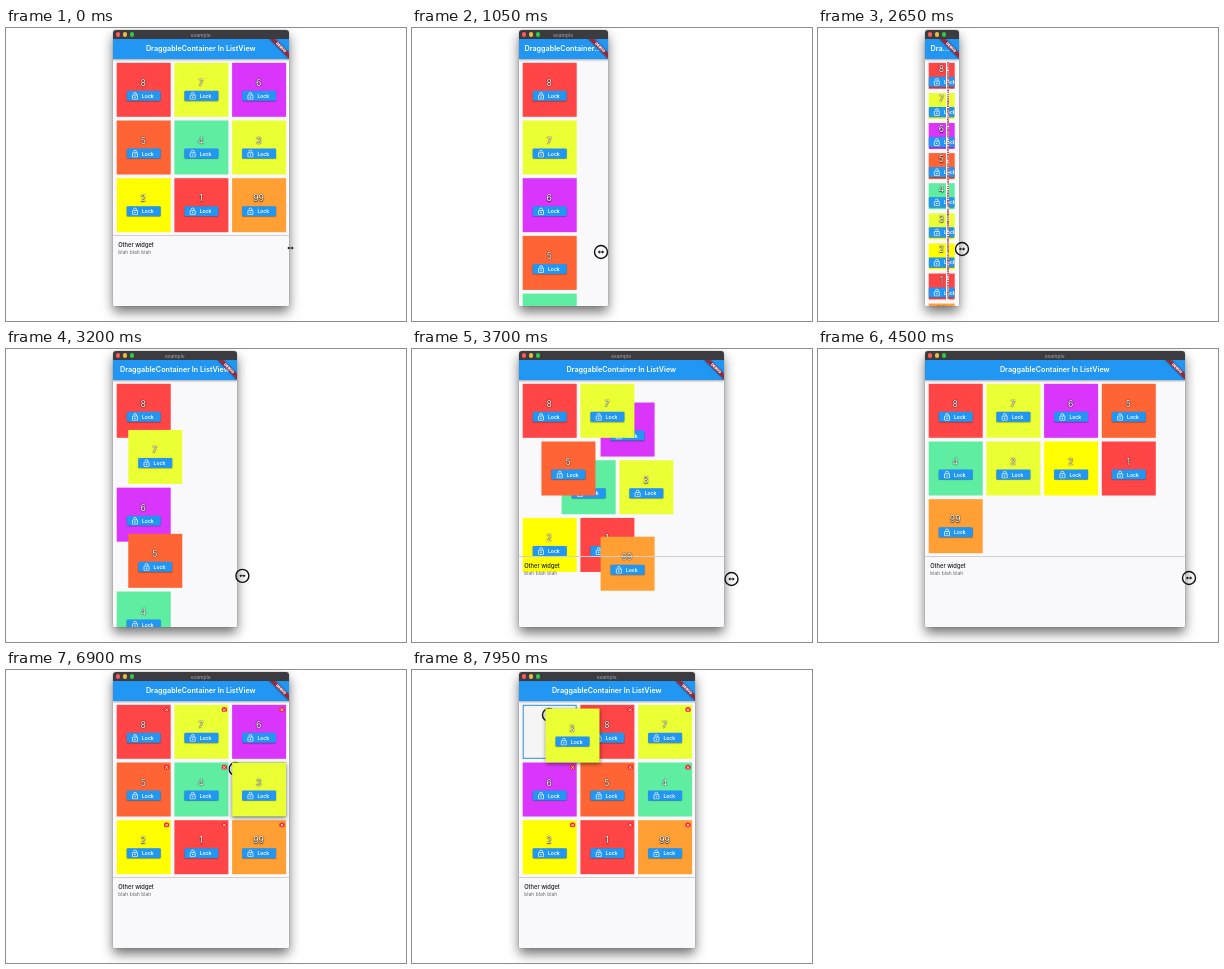
Write an HTML page that moves like this. It is 400 px wide and 293 px high and loops after 8000 ms.

```html
<!DOCTYPE html>
<html lang="en">
<head>
<meta charset="utf-8">
<title>Draggable grid</title>
<style>
html, body { margin: 0; width: 100%; height: 100%; overflow: hidden; background: #fff; }
body { position: relative; font-family: Inter, Roboto, sans-serif; }
div, svg { position: absolute; box-sizing: border-box; white-space: nowrap; }
#shadow { left: 106.5px; top: 1.5px; height: 276px; border-radius: 3px;
  box-shadow: 0 6px 12px rgba(0,0,0,.55), 0 0 1px rgba(0,0,0,.6); }
#window { inset: 0; border-radius: 3px 3px 1.5px 1.5px; overflow: hidden; background: #f9f8fa; }
#titlebar { left: 0; right: 0; top: 0; height: 9px; background: #3b3b40; z-index: 6; }
#caption { left: 0; right: 0; top: 0; font-size: 5px; line-height: 10px; text-align: center; color: #a5a5a8; }
.light { top: 2.7px; width: 4.4px; height: 4.4px; border-radius: 50%; }
#appbar { left: 0; right: 0; top: 9px; height: 20.5px; padding: 0 6px; background: #2196f3; z-index: 5;
  box-shadow: 0 1px 2px rgba(0,0,0,.35); color: #fff; font-size: 7.2px; font-weight: 600;
  line-height: 20.5px; text-align: center; overflow: hidden; text-overflow: ellipsis; }
#appbar.tight { text-align: left; }
#corner { right: 0; top: 9px; width: 30px; height: 30px; overflow: hidden; z-index: 7; }
#debug { left: 15.6px; top: 10px; width: 28.8px; height: 4.4px; transform-origin: 14.4px -10px;
  transform: rotate(45deg); background: rgba(165,24,30,.85); box-shadow: 0 0 2px rgba(0,0,0,.6);
  color: #fff; font-size: 3.7px; font-weight: 900; line-height: 4.4px; text-align: center; }
.tile { left: 0; top: 0; overflow: hidden; }
.label { left: 0; right: 0; top: 50%; margin-top: -11.6px; line-height: 11px; font-size: 8.6px;
  text-align: center; color: #fff; text-shadow: 0 0 1px #000, 0 .5px 1.2px rgba(0,0,0,.8); }
.button { left: 50%; top: 50%; width: 34px; max-width: 100%; height: 10.8px; margin-top: 1px;
  transform: translateX(-50%); border-radius: 1px; background: #2196f3; color: #fff;
  box-shadow: 0 .6px 1px rgba(0,0,0,.4); overflow: hidden; }
.button svg { left: 4.4px; top: 1px; width: 8.6px; height: 8.6px; }
.button div { left: 15.8px; top: 0; font-size: 5.04px; font-weight: 600; line-height: 10.8px; }
.remove { right: .3px; top: 2.2px; width: 5.8px; height: 5.8px; }
#slot { left: 0; top: 0; width: 54px; height: 54px; border: 1.4px solid #2a8fe0; background: #f5f5f6; }
#overflow { top: 32.5px; height: 238px; width: 3.2px; overflow: hidden; z-index: 3; background: #fff;
  color: #a00010; font-size: 2.6px; font-weight: 800; line-height: 3.2px; writing-mode: vertical-rl; }
#other { left: 0; right: 0; height: 30px; border-top: .6px solid #cfcfd2; z-index: 4; }
#other div { left: 5.7px; line-height: 8px; }
#heading { top: 5.4px; font-size: 5.76px; font-weight: 500; color: #1c1c1e; }
#detail { top: 12.4px; font-size: 5.04px; color: #6c6c70; }
#cursor { left: 0; top: 0; width: 20px; height: 20px; margin: -10px 0 0 -10px; }
</style>
</head>
<body>
<div id="shadow"><div id="window">
  <div id="titlebar">
    <div class="light" style="left:3.2px;background:#fc5b57"></div>
    <div class="light" style="left:10.3px;background:#e8bd3f"></div>
    <div class="light" style="left:17.4px;background:#34c648"></div>
    <div id="caption">example</div>
  </div>
  <div id="appbar">DraggableContainer In ListView</div>
  <div id="corner"><div id="debug">DEBUG</div></div>
  <div id="slot"></div>
  <div id="overflow"></div>
  <div id="other"><div id="heading">Other widget</div><div id="detail">blah blah blah</div></div>
</div></div>
<svg id="cursor" viewBox="-10 -10 20 20">
  <circle id="ring" r="6.5" fill="none" stroke="#111" stroke-width="1.4"/>
  <path id="resize" d="M-3.2 0L-1.2 -1.7V-.5H1.2V-1.7L3.2 0L1.2 1.7V.5H-1.2V1.7Z" fill="#111" stroke="#fff" stroke-width=".6" paint-order="stroke"/>
  <path id="pointer" d="M-1 -2V4L.4 2.8L1.4 5L2.4 4.5L1.5 2.4H3.3Z" fill="#111" stroke="#fff" stroke-width=".6" paint-order="stroke"/>
</svg>
<script>
const LOOP = 8000, STEP = 50, SLIDE = 200;
const LEFT = 106.5, TOP = 1.5, TILE = 54, GAP = 3.7;
const ORIGIN = { x: 110.2 - LEFT, y: 34.3 - TOP };
const DRAGGED = 5, LIFT = 6900;

const ITEMS = [
  ['8', '#ff4545'], ['7', '#ebff35'], ['6', '#da36fb'],
  ['5', '#ff6434'], ['4', '#5feda2'], ['3', '#ebff35'],
  ['2', '#ffff00'], ['1', '#ff4545'], ['99', '#ff9f34']
];

// time, right edge of the window
const EDGE = [
  [0, 283], [50, 282.5], [850, 215], [1050, 196], [1700, 155], [2200, 137], [2500, 137],
  [2650, 141], [3400, 264], [3700, 312], [4250, 349], [4500, 367], [4700, 382],
  [5100, 310], [5350, 286], [5500, 285], [5800, 283]
];
// time, cursor x, cursor y
const CURSOR = [
  [0, 284.5, 220], [850, 210, 224], [1050, 189, 224], [1700, 150, 223], [2200, 138, 221],
  [2650, 144, 221], [3400, 270, 229], [3700, 319.5, 230], [4250, 354, 229], [4500, 371, 229],
  [4700, 386, 229], [5100, 308, 229], [5350, 284.5, 229], [6000, 284.5, 229], [6200, 255, 150],
  [6400, 229.6, 99], [6950, 229.6, 99], [7250, 200, 80], [7450, 172, 62], [7700, 137, 45]
];
// time, columns, slot of the dragged tile
const LAYOUT = [
  [-SLIDE, 3, 5], [60, 2, 5], [760, 1, 5], [3160, 2, 5], [3565, 3, 5], [4130, 4, 5],
  [4920, 3, 5], [7250, 3, 4], [7450, 3, 1], [7650, 3, 0]
];

const $ = id => document.getElementById(id);
const lerp = (a, b, k) => a + (b - a) * k;
const show = (el, on) => { el.style.display = on ? '' : 'none'; };
const move = (el, x, y) => { el.style.transform = `translate(${x}px, ${y}px)`; };

function sample(track, t, column = 1) {
  const i = track.findIndex(key => key[0] > t);
  if (i < 0) return track[track.length - 1][column];
  const a = track[i - 1], b = track[i];
  return lerp(a[column], b[column], (t - a[0]) / (b[0] - a[0]));
}

const LOCK = `<svg viewBox="0 0 24 24" fill="none" stroke="#fff" stroke-width="2">
  <rect x="5" y="9" width="14" height="12" rx="1"/><path d="M8 6a4 4 0 0 1 8 0v3"/>
  <circle cx="12" cy="15" r="2" fill="#fff" stroke="none"/></svg>`;
const REMOVE = `<svg class="remove" viewBox="-3 -3 6 6"><circle r="2.9" fill="#f3282c"/>
  <path d="M-1.3 -1.3L1.3 1.3M1.3 -1.3L-1.3 1.3" stroke="#fff" stroke-width=".8"/></svg>`;

const tiles = ITEMS.map(([label, color], i) => {
  const el = document.createElement('div');
  el.className = 'tile';
  el.style.background = color;
  el.style.zIndex = label === '6' || label === '4' ? 1 : 2;
  el.innerHTML = `<div class="label">${label}</div>
    <div class="button">${LOCK}<div>Lock</div></div>${REMOVE}`;
  $('window').insertBefore(el, $('overflow'));
  return { el, remove: el.querySelector('.remove') };
});
$('overflow').textContent = 'RIGHT OVERFLOWED BY 7.4 PIXELS '.repeat(8);

function slotOf(i, target) {
  if (i === DRAGGED) return target;
  return i >= target && i < DRAGGED ? i + 1 : i;
}

function place(slot, columns, size) {
  const pitch = size + GAP;
  return {
    x: ORIGIN.x + slot % columns * pitch,
    y: ORIGIN.y + Math.floor(slot / columns) * pitch
  };
}

function draw(t) {
  const right = sample(EDGE, t), width = right - LEFT;
  const size = Math.min(TILE, right - 114.6);
  const cx = sample(CURSOR, t), cy = sample(CURSOR, t, 2);
  const lifted = t >= LIFT;

  $('shadow').style.width = width + 'px';
  $('appbar').className = width < 122 ? 'tight' : '';
  show($('caption'), width > 60);

  let n = LAYOUT.length - 1;
  while (LAYOUT[n][0] > t) n--;
  const [start, columns, target] = LAYOUT[n];
  const [, oldColumns, oldTarget] = LAYOUT[Math.max(0, n - 1)];
  const k = Math.min(1, (t - start) / SLIDE);

  tiles.forEach(({ el, remove }, i) => {
    const held = lifted && i === DRAGGED;
    const a = place(slotOf(i, oldTarget), oldColumns, size);
    const b = place(slotOf(i, target), columns, size);
    el.style.width = el.style.height = size + 'px';
    if (held) move(el, cx - 4 - LEFT, cy - 7 - TOP);
    else move(el, lerp(a.x, b.x, k), lerp(a.y, b.y, k));
    show(remove, lifted && !held);
    if (i === DRAGGED) {
      el.style.zIndex = held ? 5 : 2;
      el.style.boxShadow = held ? '0 1.5px 4px rgba(0,0,0,.5)' : 'none';
    }
  });

  const hole = place(target, columns, size);
  move($('slot'), hole.x, hole.y);
  show($('slot'), lifted);

  show($('overflow'), size < 34);
  $('overflow').style.left = width - 13.2 + 'px';

  const rows = Math.ceil(ITEMS.length / columns);
  $('other').style.top = ORIGIN.y + rows * (size + GAP) - .6 + 'px';

  const resizing = t < 5350;
  move($('cursor'), cx, cy);
  show($('resize'), resizing);
  show($('pointer'), !resizing);
  show($('ring'), t >= 50 && t < 5700 || t >= 6400);
}

function tick(now) {
  draw(Math.floor(now % LOOP / STEP) * STEP);
  requestAnimationFrame(tick);
}
draw(0);
requestAnimationFrame(tick);
</script>
</body>
</html>
```
